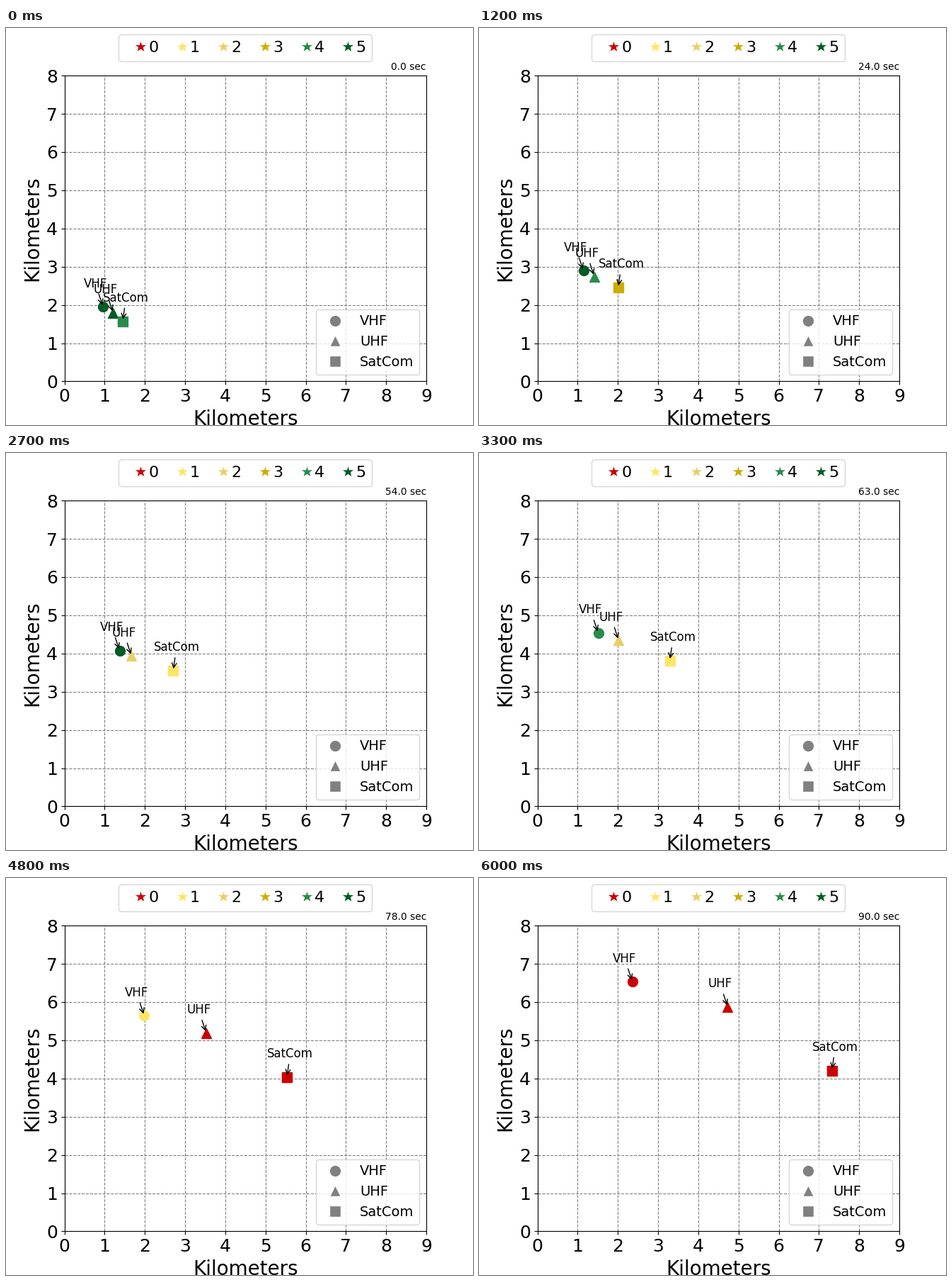
A matplotlib script that plays this animation: 660x560 px, repeating every 6.3 s.

```python
import matplotlib.pyplot as plt
from matplotlib.animation import FuncAnimation
from matplotlib.lines import Line2D

FRAMES = 21
TURN = 10  # frame where every track bends and the clock slows down
COLORS = ["#cd0000", "#ffe566", "#e8d068", "#cdad00", "#2a8c4a", "#005c25"]


class Track:
    """A radio that moves along two straight legs while its signal fades."""

    def __init__(self, name, marker, points, level=5, onset=0, pace=3):
        self.name, self.marker, self.points = name, marker, points
        self.level, self.onset, self.pace = level, onset, pace

    def position(self, k):
        leg = 0 if k < TURN else 1
        t = (k - leg * TURN) / TURN
        (x0, y0), (x1, y1) = self.points[leg:leg + 2]
        return x0 + (x1 - x0) * t, y0 + (y1 - y0) * t

    def color(self, k):
        lost = int(max(k - self.onset, 0) / self.pace)
        return COLORS[max(self.level - lost, 0)]


TRACKS = [
    Track("VHF", "o", [(0.963, 1.95), (1.42, 4.31), (2.365, 6.53)],
          onset=9, pace=1.7),
    Track("UHF", "^", [(1.211, 1.79), (1.719, 4.172), (4.733, 5.866)]),
    Track("SatCom", "s", [(1.45, 1.575), (2.845, 3.768), (7.324, 4.208)],
          level=4),
]


def clock(k):
    return 6.0 * min(k, TURN) + 3.0 * max(k - TURN, 0)


def key(marker, color, label, size):
    return Line2D([], [], color="w", marker=marker, markerfacecolor=color,
                  markersize=size, label=label)


plt.rcParams["font.family"] = "DejaVu Sans"
fig, ax = plt.subplots(figsize=(6.6, 5.6), dpi=100)
ax.set_xlim(0, 9)
ax.set_ylim(0, 8)
ax.set_xticks(range(10))
ax.set_yticks(range(9))
ax.tick_params(labelsize=18)
ax.set_xlabel("Kilometers", fontsize=20)
ax.set_ylabel("Kilometers", fontsize=20)
ax.grid(color="gray", linestyle="--")
title = ax.set_title("", loc="right", fontsize=10)

levels = ax.legend(
    handles=[key("*", c, str(i), 15) for i, c in enumerate(COLORS)],
    loc="upper center", bbox_to_anchor=(0.5, 1.16), ncol=6, fontsize=16,
    handletextpad=-0.5, columnspacing=0.5)
ax.add_artist(levels)
ax.legend(handles=[key(t.marker, "gray", t.name, 12) for t in TRACKS],
          loc="lower right", fontsize=14)

dots = [ax.scatter([0], [0], s=100, marker=t.marker, linewidths=1, zorder=2)
        for t in TRACKS]
notes = [ax.annotate(t.name, xy=(0, 0), xytext=(-20, 20),
                     textcoords="offset points", fontsize=12,
                     arrowprops=dict(arrowstyle="->"))
         for t in TRACKS]


def update(k):
    for track, dot, note in zip(TRACKS, dots, notes):
        note.xy = track.position(k)
        dot.set_offsets([note.xy])
        dot.set_color(track.color(k))
    title.set_text(f"{clock(k):.1f} sec")
    return [*dots, *notes, title]


anim = FuncAnimation(fig, update, frames=FRAMES, init_func=lambda: update(0),
                     interval=300, repeat=True, repeat_delay=0, blit=False)
plt.show()
```
